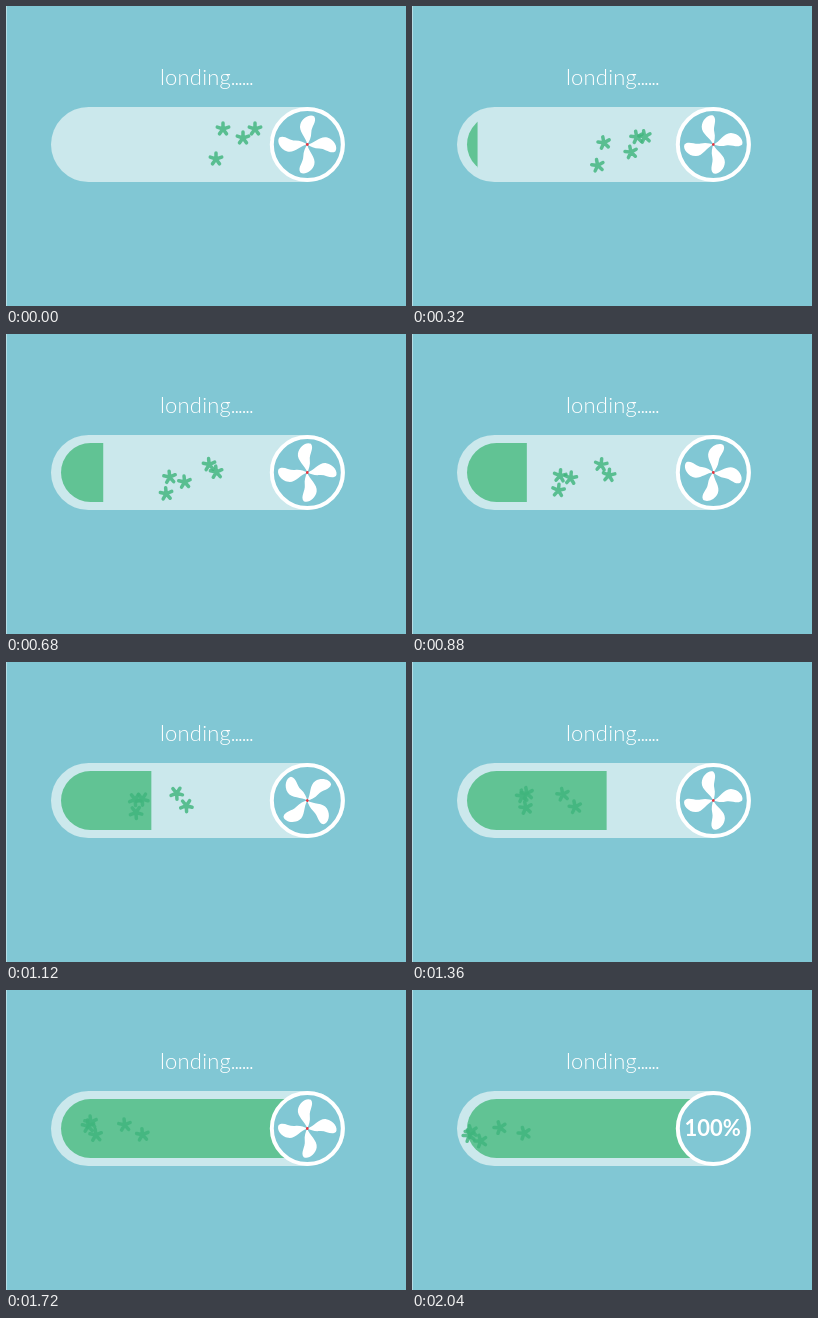
These frames come from a looping animation (400x300 px, 2080 ms). An HTML page with a canvas:

```html
<!DOCTYPE html>
<html>
<head>
<meta charset="utf-8">
<style>
html, body { margin: 0; width: 100%; height: 100%; overflow: hidden; background: #81c7d4; }
canvas { display: block; }
</style>
</head>
<body>
<canvas id="stage" width="400" height="300"></canvas>
<script>
const ctx = document.getElementById('stage').getContext('2d');
const LOOP = 2080, STEP = 40, FULL_AT = 1840, TAU = Math.PI * 2;
const HUB = { x: 301.3, y: 138.5 };

// Each flake drifts left between two points; bow and wave bend its path.
const FLAKES = [
  { from: [249, 123], to: [109, 143], ease: 1.15, bow: 10, wave: 0 },
  { from: [237, 132], to: [84, 138], ease: 1.35, bow: -4, wave: 0 },
  { from: [217, 123], to: [54, 147], ease: 1, bow: 4, wave: 10 },
  { from: [210, 153], to: [66, 152], ease: 0.95, bow: 0, wave: 8 },
  { from: [272, 136], to: [56, 143], ease: 0.75, bow: 0, wave: 11 }
];

const mix = (a, b, k) => a + (b - a) * k;

// Steady at first, then speeding up.
function fillEdge(t) {
  const late = Math.max(0, t - 880);
  return 55 + 0.088 * Math.max(0, t - 200) + 0.000163 * late * late;
}

function pill(x, y, w, h, color) {
  ctx.fillStyle = color;
  ctx.beginPath();
  ctx.roundRect(x, y, w, h, h / 2);
  ctx.fill();
}

function label(text, x, y, font, spacing = 0) {
  ctx.fillStyle = '#fff';
  ctx.font = font;
  ctx.letterSpacing = spacing + 'px';
  ctx.fillText(text, x, y);
}

function flake({ from, to, ease, bow, wave }, p) {
  const x = mix(from[0], to[0], p ** ease);
  const y = mix(from[1], to[1], p) + bow * Math.sin(Math.PI * p) + wave * Math.sin(TAU * p);
  ctx.beginPath();
  for (let i = 0; i < 5; i++) {
    const a = (i + 12 * p) * TAU / 5;
    ctx.moveTo(x, y);
    ctx.lineTo(x + 6 * Math.sin(a), y - 6 * Math.cos(a));
  }
  ctx.strokeStyle = 'rgba(63, 181, 124, .82)';
  ctx.lineWidth = 3.5;
  ctx.lineCap = 'round';
  ctx.stroke();
}

function fan(turn) {
  ctx.save();
  ctx.translate(HUB.x, HUB.y);
  ctx.rotate(turn);
  ctx.fillStyle = '#fff';
  for (let i = 0; i < 4; i++) {
    ctx.beginPath();
    ctx.moveTo(0, 0);
    ctx.bezierCurveTo(-1, -7, -9, -13, -7, -20);
    ctx.bezierCurveTo(-5, -27, 3, -31, 7, -28);
    ctx.bezierCurveTo(10, -23, 4, -18, 4, -12);
    ctx.bezierCurveTo(4, -7, 2, -3, 0, 0);
    ctx.fill();
    ctx.rotate(TAU / 4);
  }
  ctx.fillStyle = '#e5343f';
  ctx.beginPath();
  ctx.arc(0, 0, 1.4, 0, TAU);
  ctx.fill();
  ctx.restore();
}

function draw(t) {
  const p = t / LOOP;
  ctx.fillStyle = '#81c7d4';
  ctx.fillRect(0, 0, 400, 300);
  ctx.fillStyle = '#b5dde5';
  ctx.fillRect(0, 0, 1, 300);

  label('londing', 154, 79, '300 22px Lato, sans-serif', 0.2);
  label('......', 224.5, 79, '300 22px Lato, sans-serif', -1.5);

  pill(45, 101, 294, 75, '#cbe8ec');
  ctx.save();
  ctx.beginPath();
  ctx.rect(0, 100, fillEdge(t), 80);
  ctx.clip();
  pill(55, 109, 274, 59, '#61c394');
  ctx.restore();

  for (const f of FLAKES) flake(f, p);

  ctx.fillStyle = '#81c7d4';
  ctx.strokeStyle = '#fff';
  ctx.lineWidth = 4;
  ctx.beginPath();
  ctx.arc(HUB.x, HUB.y, 35.5, 0, TAU);
  ctx.fill();
  ctx.stroke();
  if (t < FULL_AT) fan(3 * TAU * p);
  else label('100%', 272.5, 146, 'bold 22px Lato, sans-serif');
}

function tick(now) {
  draw(Math.floor(now % LOOP / STEP) * STEP);
  requestAnimationFrame(tick);
}
draw(0);
requestAnimationFrame(tick);
</script>
</body>
</html>
```
